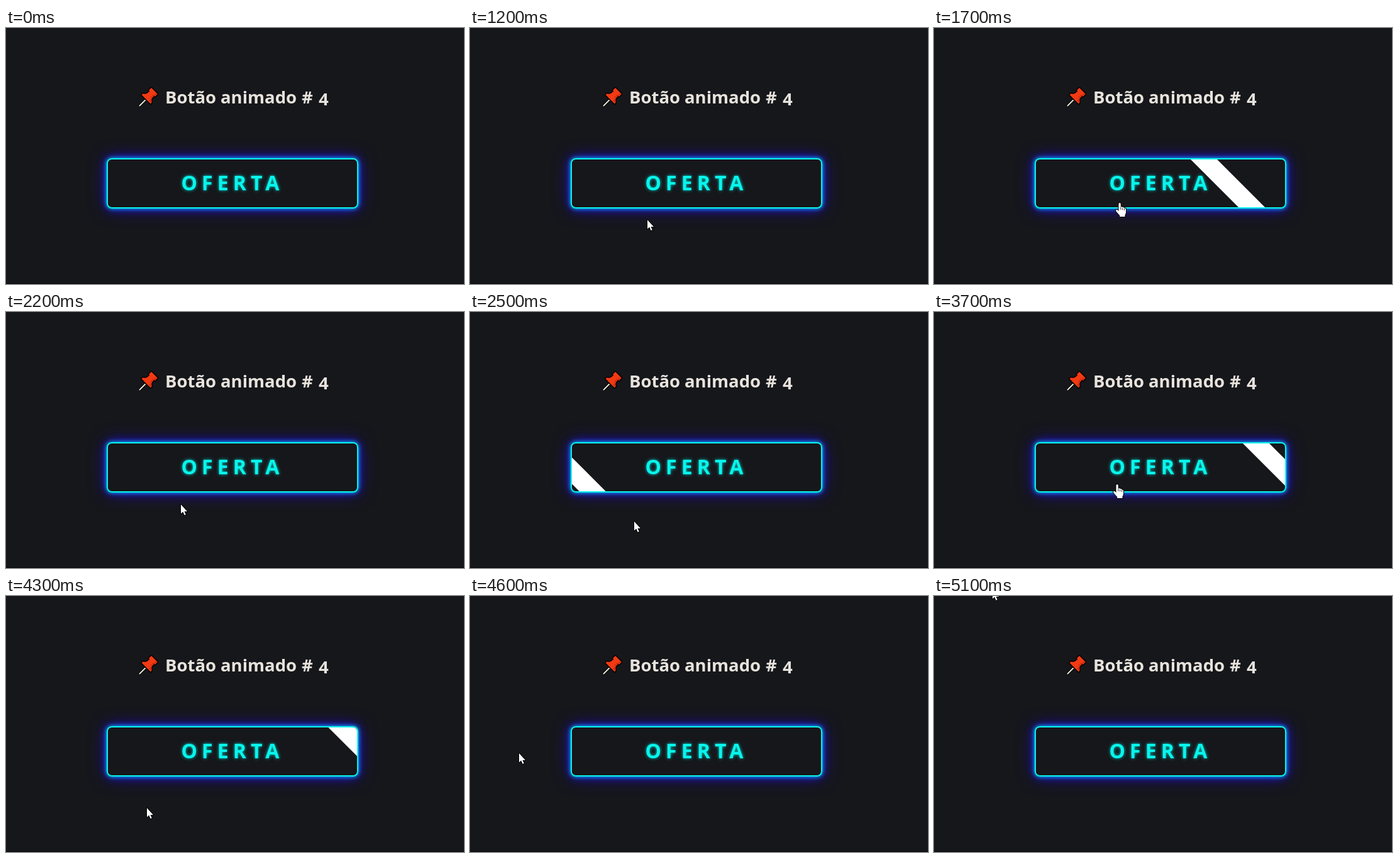
Write an HTML page with a canvas that moves like this. It is 728x407 px and loops after 5.4 s.

```html
<!DOCTYPE html>
<html lang="pt">
<head>
<meta charset="utf-8">
<title>Botão animado</title>
<style>
  html, body { margin: 0; width: 100%; height: 100%; overflow: hidden; background: #16171b; }
  #stage { position: relative; width: 728px; height: 407px; overflow: hidden; }
  #stage > * { position: absolute; }
  #edge { left: 0; top: 406px; width: 728px; height: 1px; background: #08090b; }
  #button {
    left: 160px; top: 207px; width: 400px; height: 80px; box-sizing: border-box;
    border: 2px solid #08f5ec; border-radius: 8px;
    box-shadow: 0 0 6px #00d8ff, 0 0 14px #241cf0, 0 0 28px #1c0c9c;
  }
  svg, canvas { left: 0; top: 0; }
  text { font-family: "Open Sans", "Noto Sans", sans-serif; font-weight: 700; }
  .title { font-size: 27.5px; fill: #e8e3dd; }
  .label { font-size: 32px; letter-spacing: 7.1px; fill: #08f5ec; filter: drop-shadow(0 0 2.5px #00c8c0); }
</style>
</head>
<body>
<div id="stage">
  <div id="edge"></div>
  <div id="button"></div>
  <svg width="728" height="407">
    <g transform="translate(212 124) rotate(-45)" stroke-linejoin="round">
      <path d="M0 0H17" stroke="#000" stroke-width="4"/>
      <path d="M0 0H17" stroke="#e9e6d8" stroke-width="2"/>
      <path d="M15 -10H18Q20 -6 23 -5.5L28 -5V-7H34V7H28V5L23 5.5Q20 6 18 10H15Z"
            fill="#f23a12" stroke="#000" stroke-width="3" paint-order="stroke"/>
      <path d="M16 5H19L23 2.5H29V4H33V6.5H28V4.5L23 5.2Q20 6 18 9.5H16Z" fill="#d32f12"/>
    </g>
    <g class="title">
      <text x="253" y="120">Botão</text>
      <text x="341" y="120">animado</text>
      <text x="470" y="120">#</text>
      <text x="497" y="123">4</text>
    </g>
    <text class="label" x="278.5" y="258">OFERTA</text>
  </svg>
  <canvas id="view" width="728" height="407"></canvas>
</div>
<script>
const LOOP = 5400, STEP = 100;
const BOX = { x: 162, y: 209, w: 396, h: 76 };
const BAND = 42, HIDDEN_LEFT = -90, PEEK = 76, HIDDEN_RIGHT = 640;
const ctx = document.getElementById('view').getContext('2d');

// The stripe runs at a constant speed, right on hover and left on leave.
const sweeps = [
  { start: 1400, from: HIDDEN_LEFT, to: HIDDEN_RIGHT },
  { start: 2160, from: HIDDEN_RIGHT, to: HIDDEN_LEFT },
  { start: 3200, from: HIDDEN_LEFT, to: PEEK },
  { start: 3450, from: PEEK, to: HIDDEN_RIGHT },
  { start: 4220, from: HIDDEN_RIGHT, to: HIDDEN_LEFT }
];

// Each pointer stroke follows a Bézier curve, then rests at its end.
const strokes = [
  { start: 400, end: 1500, points: [[17, 2], [147, 513], [333, 265], [295, 278]] },
  { start: 1900, end: 2500, points: [[295, 278], [261, 333]] },
  { start: 2750, end: 3300, points: [[261, 333], [291, 274]] },
  { start: 3900, end: 4300, points: [[291, 274], [224, 337]] },
  { start: 4300, end: 5100, points: [[224, 337], [-73, 342], [192, 67], [93, -10]] }
];

const arrow = new Path2D('M0 0V14.5L3.3 11.5L5.6 17L7.8 16L5.5 11H10Z');
const hand = new Path2D(
  'M5 2Q5 0 6.7 0Q8.3 0 8.3 2V7Q9 6 10 6.2Q11.2 6.3 11.3 7.3Q13.8 6.6 14 8.5' +
  'Q16.5 8 16.6 10.5V15Q16.4 17.5 15 19.5V22H6.7V20Q4 17 .8 13.2Q0 11.4 1.4 10.8Q3 10.5 5 13.2Z');
const fingers = new Path2D('M8.4 7V11M11.3 8V11.5M14.1 9V12');

const inner = new Path2D();
inner.roundRect(BOX.x, BOX.y, BOX.w, BOX.h, 6);

const current = (list, t) => list.findLast(item => item.start <= t);
const mix = (a, b, k) => a.map((v, i) => v + (b[i] - v) * k);

function bezier(points, k) {
  while (points.length > 1) {
    points = points.slice(1).map((p, i) => mix(points[i], p, k));
  }
  return points[0];
}

function stripeX(t) {
  const sweep = current(sweeps, t);
  if (!sweep) return HIDDEN_LEFT;
  const { start, from, to } = sweep;
  return to > from
    ? Math.min(to, from + 1.66 * (t - start))
    : Math.max(to, from - 1.595 * (t - start));
}

function drawStripe(x) {
  ctx.save();
  ctx.clip(inner);
  ctx.translate(x, BOX.y);
  ctx.transform(1, 0, 1, 1, 0, 0);
  ctx.fillStyle = '#fff';
  ctx.fillRect(0, 0, BAND, BOX.h);
  ctx.restore();
}

function drawPointer(t) {
  const stroke = current(strokes, t);
  if (!stroke) return;
  const { start, end, points } = stroke;
  const [x, y] = bezier(points, Math.min(1, (t - start) / (end - start)));
  const over = x > 160 && x < 560 && y > 207 && y < 287;
  const shape = over ? hand : arrow;
  ctx.save();
  ctx.translate(Math.round(x) - (over ? 6.5 : 0), Math.round(y));
  ctx.lineJoin = 'round';
  ctx.strokeStyle = '#000';
  ctx.lineWidth = 2;
  ctx.stroke(shape);
  ctx.fillStyle = '#fff';
  ctx.fill(shape);
  if (over) {
    ctx.lineWidth = 0.8;
    ctx.stroke(fingers);
  }
  ctx.restore();
}

function draw(time) {
  const t = Math.floor((time % LOOP) / STEP) * STEP;
  ctx.clearRect(0, 0, 728, 407);
  drawStripe(stripeX(t));
  drawPointer(t);
}

let origin;
function tick(now) {
  origin ??= now;
  draw(now - origin);
  requestAnimationFrame(tick);
}
draw(0);
requestAnimationFrame(tick);
</script>
</body>
</html>
```
